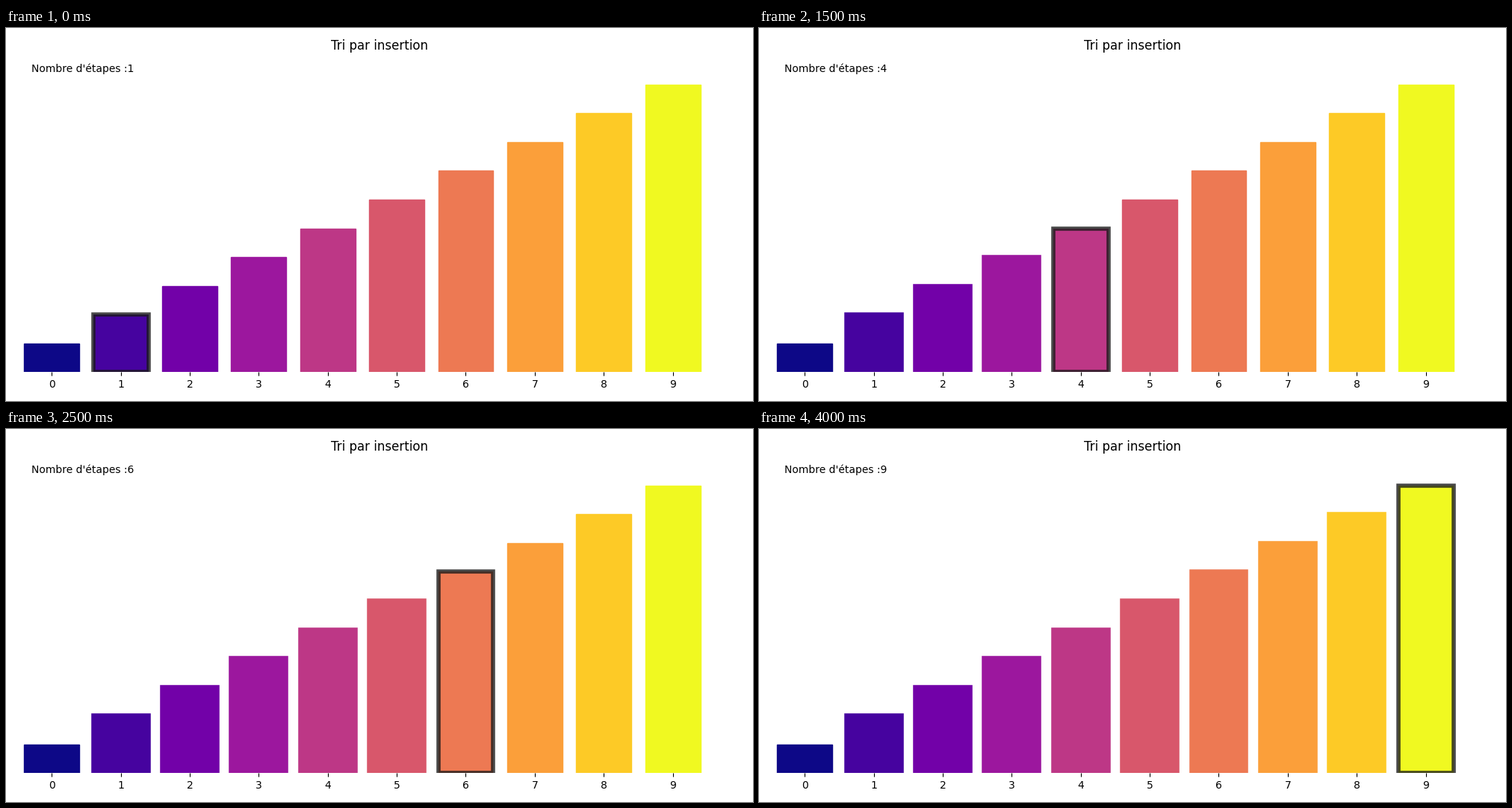
Write a matplotlib script that moves like this. It is 1000x500 px and loops after 4.5 s.

```python
import matplotlib.pyplot as plt
import numpy as np
from matplotlib.animation import FuncAnimation

COUNT = 10
STEP_MS = 500
THIN, THICK = 1, 4
MARK = (0.1, 0.1, 0.1, 0.8)

values = np.arange(1, COUNT + 1)
colors = plt.cm.plasma(np.linspace(0, 1, COUNT))

fig, ax = plt.subplots(figsize=(10, 5), dpi=100)
bars = ax.bar(range(COUNT), values, color=colors, edgecolor=colors, linewidth=THIN)
ax.set_title("Tri par insertion")
ax.set_xlim(-0.5, COUNT)
ax.set_ylim(0, COUNT + 1)
ax.set_xticks(range(COUNT))
ax.yaxis.set_visible(False)
ax.spines[:].set_visible(False)
counter = ax.text(0.02, 0.95, "", transform=ax.transAxes)
fig.tight_layout()


def update(frame):
    """Mark the bar being inserted; bars already visited keep a thick edge."""
    current = frame + 1
    for i, bar in enumerate(bars):
        bar.set_edgecolor(MARK if i == current else colors[i])
        bar.set_linewidth(THICK if 1 <= i <= current else THIN)
    counter.set_text(f"Nombre d'étapes :{current}")
    return [*bars, counter]


anim = FuncAnimation(fig, update, frames=COUNT - 1, init_func=lambda: update(0),
                     interval=STEP_MS, repeat=True, repeat_delay=0)
plt.show()
```
